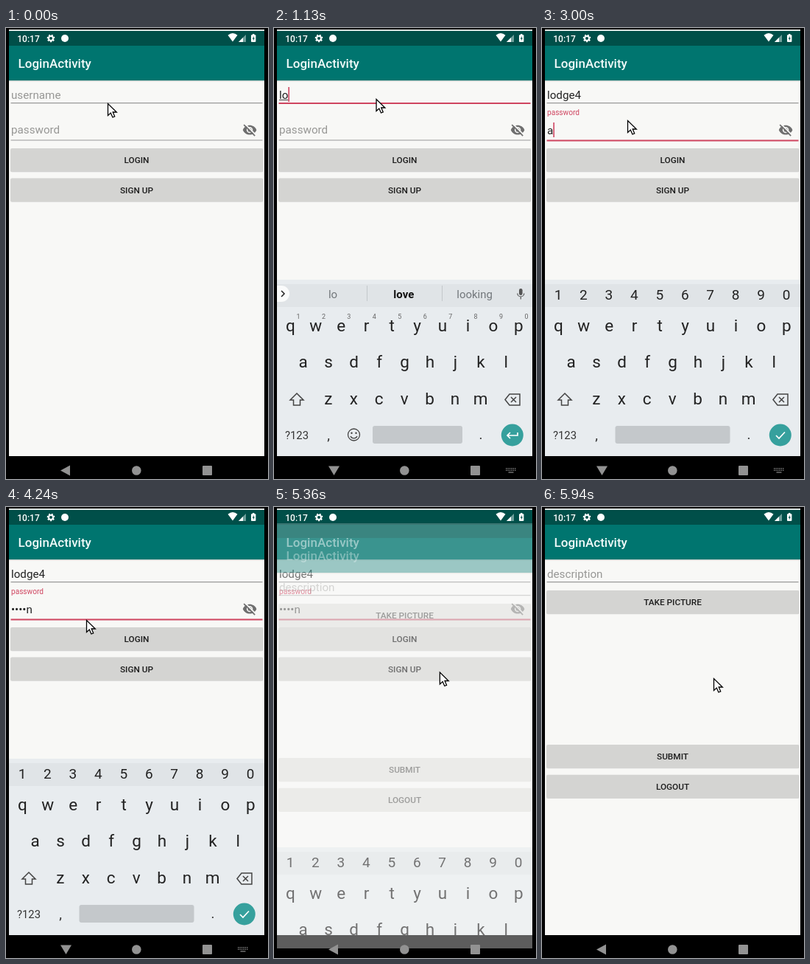
An HTML page with a canvas for the animation above (7.99 s loop, 356x611 px).

```html
<!DOCTYPE html>
<html lang="en">
<head>
<meta charset="utf-8">
<title>Login screen</title>
<style>
  html, body { margin: 0; width: 100%; height: 100%; overflow: hidden; background: #000; }
  canvas { display: block; }
</style>
</head>
<body>
<canvas id="stage" width="356" height="611"></canvas>
<script>
const ctx = document.getElementById('stage').getContext('2d');
const LOOP = 7990;
const ACCENT = '#cf4560', GREY = '#979795', INK = '#222', TEAL = '#00756f', STATUS = '#004f49';
const TOP = 4, BOTTOM = 580;

const TICKS = [0, 150, 300, 430, 580, 730, 860, 990, 1130, 1250, 1400, 1520, 1650, 1920, 2080,
  2220, 2340, 2460, 2610, 2730, 2850, 3000, 3120, 3270, 3420, 3540, 3690, 3820, 4090, 4240,
  4360, 4510, 4670, 4790, 4940, 5060, 5220, 5360, 5510, 5640, 5780, 5940];

const USER = { text: 'lodge4', times: [900, 1100, 1330, 1600, 1990, 2300] };
const PASS = { text: 'admin', times: [2950, 3200, 3400, 3500, 3730] };
const FOCUS_USER = 150, FOCUS_PASS = 2600, LEAVE = 5300;

const SUGGESTIONS = {
  l: ['l', 'love', 'like'],
  lo: ['lo', 'love', 'looking'],
  lod: ['lod', 'lodge', 'lodging'],
  lodg: ['lodg', 'lodge', 'lodging'],
  lodge: ['lodges', 'lodge', 'lodged'],
  lodge4: ['lodge', 'lodge4', 'lodges']
};

// time, x, y of the pointer tip
const POINTER = [[0, 138, 102], [990, 139, 96], [1900, 136, 96], [2220, 134, 99], [2600, 119, 129],
  [3000, 116, 125], [3690, 113, 138], [4240, 109, 153], [4400, 109, 153], [4940, 219, 220],
  [5220, 221, 224], [5510, 229, 223], [5780, 233, 232]];

const mix = (a, b, p) => a + (b - a) * p;
const ramp = (t, from, to) => Math.min(1, Math.max(0, (t - from) / (to - from)));
const easeOut = p => 1 - (1 - p) ** 2;
const typedCount = (field, t) => field.times.filter(at => at <= t).length;

function rect(x, y, w, h, color, radius = 0) {
  ctx.fillStyle = color;
  ctx.beginPath();
  ctx.roundRect(x, y, w, h, radius);
  ctx.fill();
}

function disc(x, y, r, color) {
  ctx.fillStyle = color;
  ctx.beginPath();
  ctx.arc(x, y, r, 0, 7);
  ctx.fill();
}

function label(str, x, y, size, color = INK, align = 'left', weight = 400) {
  ctx.font = `${weight} ${size}px Roboto, sans-serif`;
  ctx.textAlign = align;
  ctx.fillStyle = color;
  ctx.fillText(str, x, y);
  return ctx.measureText(str).width;
}

function shape(d, x, y, { fill, stroke, width = 1.5, scale = 1, rule = 'nonzero' }) {
  const path = new Path2D(d);
  ctx.save();
  ctx.translate(x, y);
  ctx.scale(scale, scale);
  if (fill) { ctx.fillStyle = fill; ctx.fill(path, rule); }
  if (stroke) { ctx.strokeStyle = stroke; ctx.lineWidth = width; ctx.stroke(path); }
  ctx.restore();
}

const underline = (y, focused) =>
  rect(6.5, y, 342, focused ? 2 : 1.2, focused ? ACCENT : '#999');

function button(str, y) {
  rect(6, y, 343.5, 32.3, '#d4d4d2', 2);
  label(str, 177.5, y + 20.3, 11.8, '#1d1d1d', 'center', 500);
}

function caret(x, y, since, t) {
  if ((t - since) % 1000 < 500) rect(x, y, 1.6, 20, ACCENT);
}

function appWindow() {
  rect(4, TOP, 347, BOTTOM - TOP, '#f8f8f6');
  rect(4, TOP, 347, 20, STATUS);
  rect(4, 71, 347, 1, '#c9cfcd');
  rect(4, 72, 347, 1, '#ebecea');
  rect(4, 24, 347, 47, TEAL);
  label('LoginActivity', 16.6, 54.3, 17, '#f2fbfa', 'left', 500);
}

function passwordEye() {
  shape('M1 12C5 2 19 2 23 12C19 22 5 22 1 12ZM7 12a5 5 0 1 0 10 0a5 5 0 1 0-10 0ZM9 12a3 3 0 1 0 6 0a3 3 0 1 0-6 0Z',
    321, 128, { fill: '#6f6f6f', scale: 0.844, rule: 'evenodd' });
  shape('M4 2L22 20', 321, 128, { stroke: '#f8f8f6', width: 2, scale: 0.844 });
  shape('M2.6 3.6L20.4 21.4', 321, 128, { stroke: '#6f6f6f', width: 2, scale: 0.844 });
}

function loginScreen(t) {
  appWindow();
  const onUser = t >= FOCUS_USER && t < FOCUS_PASS, onPass = t >= FOCUS_PASS;

  const count = typedCount(USER, t);
  if (count) {
    const width = label(USER.text.slice(0, count), 7, 95.5, 15.2);
    if (onUser) {
      rect(7, 97, width, 1, '#444');
      caret(7 + width, 80, USER.times[count - 1], t);
    }
  } else {
    label('username', 7, 95.5, 15.2, GREY);
    if (onUser) caret(7, 80, FOCUS_USER, t);
  }
  underline(101, onUser);

  const lift = easeOut(ramp(t, FOCUS_PASS - 60, FOCUS_PASS + 110));
  label('password', 7, mix(143.2, 118.3, lift), mix(15.2, 10.1, lift), onPass ? ACCENT : GREY);
  const n = typedCount(PASS, t);
  const shown = n ? '•'.repeat(n - 1) + PASS.text[n - 1] : '';
  const width = label(shown, 7, 143.7, 15.2);
  if (onPass) caret(7 + width, 128, n ? PASS.times[n - 1] : FOCUS_PASS, t);
  underline(151.4, onPass);
  passwordEye();

  button('LOGIN', 163);
  button('SIGN UP', 203.5);
}

function postScreen() {
  appWindow();
  label('description', 7, 95.5, 15.2, GREY);
  underline(101, false);
  button('TAKE PICTURE', 113);
  button('SUBMIT', 322);
  button('LOGOUT', 362.7);
}

function keyRow(keys, x, y, size) {
  [...keys].forEach((key, i) => label(key, x + i * 34.45, y, size, INK, 'center'));
}

function suggestionBar(t) {
  rect(126, 349, 1, 21, '#c3c8cb');
  rect(228, 349, 1, 21, '#c3c8cb');
  rect(4, 349, 17, 22, '#fafbfb', [0, 11, 11, 0]);
  shape('M-2-4L2 0L-2 4', 12, 360, { stroke: '#222' });
  const words = SUGGESTIONS[USER.text.slice(0, typedCount(USER, t))] || [];
  words.forEach((word, i) =>
    label(word, 80 + i * 96.3, 366, 15, i === 1 ? '#111' : '#72777b', 'center', i === 1 ? 700 : 400));
  rect(333, 353, 4.6, 9, '#555', 2.3);
  shape('M-4.5-1a4.5 4.5 0 0 0 9 0M0 4V7', 335.3, 360.5, { stroke: '#555', width: 1.2 });
}

function keyboard(t) {
  const secret = t >= FOCUS_PASS;
  rect(4, 341, 347, 240, '#e8ecef');
  rect(4, 347, 347, 31, '#e0e4e7');
  if (secret) keyRow('1234567890', 22, 368, 19);
  else {
    suggestionBar(t);
    [...'1234567890'].forEach((d, i) => label(d, 33 + i * 34.45, 393.5, 9, '#666', 'center'));
  }
  keyRow('qwertyuiop', 22.3, 411, 22.5);
  keyRow('asdfghjkl', 39.7, 460, 22.5);
  keyRow('zxcvbnm', 73.8, 509.5, 22.5);

  shape('M0-8L9 1H4.5V8H-4.5V1H-9Z', 31, 503, { stroke: '#444' });
  shape('M-10 0L-4-7.5H10V7.5H-4ZM-2-3.5L5 3.5M5-3.5L-2 3.5', 324, 503.5, { stroke: '#444' });

  label('?123', 31, 556.5, 14.8, '#333', 'center');
  label(',', 74, 558, 19, '#333', 'center');
  label('.', 281, 557, 19, '#333', 'center');
  if (secret) rect(99.5, 539, 156, 24, '#c4c8cb', 3);
  else {
    rect(134, 539, 122, 24, '#c4c8cb', 3);
    shape('M8 0a8 8 0 1 0-16 0a8 8 0 1 0 16 0M-4.5 2a5 5 0 0 0 9 0', 108.5, 551, { stroke: '#444', width: 1.3 });
    disc(105.5, 548.7, 1.2, '#444');
    disc(111.5, 548.7, 1.2, '#444');
  }
  disc(323.8, 551.5, 15, '#36a09d');
  shape(secret ? 'M-6 0L-2 4L6-4.5' : 'M7-4V0H-7M-3-4L-7 0L-3 4', 324, 552, { stroke: '#fff', width: 1.7 });
}

function statusIcons() {
  label('10:17', 15.3, 18.5, 12, '#fff', 'left', 500);
  ctx.setLineDash([2.1, 1.66]);
  shape('M4.3 0a4.3 4.3 0 1 0-8.6 0a4.3 4.3 0 1 0 8.6 0', 61, 14, { stroke: '#fff', width: 2 });
  ctx.setLineDash([]);
  shape('M3 0a3 3 0 1 0-6 0a3 3 0 1 0 6 0', 61, 14, { stroke: '#fff', width: 2 });
  disc(80, 14, 5, '#fff');
  shape('M-6.5-4.3Q0-9.5 6.5-4.3L0 4.5Z', 308, 14, { fill: '#fff' });
  shape('M0 10L10 0V10Z', 316, 9, { fill: '#6f9f9b' });
  shape('M0 10L6 4V10Z', 316, 9, { fill: '#fff' });
  rect(333, 9.3, 6.4, 9.7, '#fff', 1);
  rect(335, 8, 2.4, 2, '#fff');
  shape('M.6-3.4L-1.4.6H0V3.4L1.6-.6H.4Z', 336.2, 14.2, { fill: STATUS });
}

function navIcons(keyboardOpen) {
  const color = '#929292';
  shape(keyboardOpen ? 'M-7.5-6H7.5L0 6.5Z' : 'M6.5-7V7L-6.5 0Z', keyboardOpen ? 81.5 : 80.5, 599.5, { fill: color });
  disc(177.3, 599.5, 6.3, color);
  rect(267, 593, 13, 13, color, 1);
  if (keyboardOpen) {
    for (let i = 0; i < 12; i++) rect(315 + (i % 6) * 2.4, 596 + (i > 5) * 2.6, 1.4, 1.5, '#777');
    rect(318.5, 601.3, 7, 1.4, '#777');
  }
}

function pointer(t) {
  let i = POINTER.findIndex(([at]) => at > t);
  if (i < 0) i = POINTER.length - 1;
  const [t0, x0, y0] = POINTER[i - 1], [t1, x1, y1] = POINTER[i];
  const p = ramp(t, t0, t1);
  shape('M0 0V16L3.8 12.5L6.4 18.5L9.2 17.3L6.7 11.5H11.8Z', mix(x0, x1, p) + 0.5, mix(y0, y1, p) + 0.5,
    { fill: '#fff', stroke: '#000', width: 1.3 });
}

function draw(t) {
  rect(0, 0, 356, 611, '#000');

  const enter = ramp(t, LEAVE, 5460);
  if (enter < 1) {
    loginScreen(t);
    const open = easeOut(ramp(t, 100, 500)) * (1 - ramp(t, LEAVE - 40, 5460));
    ctx.save();
    ctx.beginPath();
    ctx.rect(4, TOP, 347, BOTTOM - TOP);
    ctx.clip();
    ctx.translate(0, (1 - open) * 240);
    if (open) keyboard(t);
    ctx.restore();
  } else {
    rect(4, TOP, 347, 20, STATUS);
  }
  if (enter > 0) {
    ctx.save();
    ctx.globalAlpha = enter;
    ctx.translate(0, Math.round(28 * (1 - ramp(t, LEAVE, 5620)) ** 2));
    postScreen();
    ctx.restore();
  }
  rect(4, 2, 347, 2, '#dfe5e3');
  statusIcons();
  navIcons(t >= FOCUS_USER && t < LEAVE);
  pointer(t);
}

let start;
function frame(now) {
  start ??= now;
  const t = (now - start) % LOOP;
  draw(TICKS.findLast(tick => tick <= t));
  requestAnimationFrame(frame);
}
requestAnimationFrame(frame);
</script>
</body>
</html>
```
